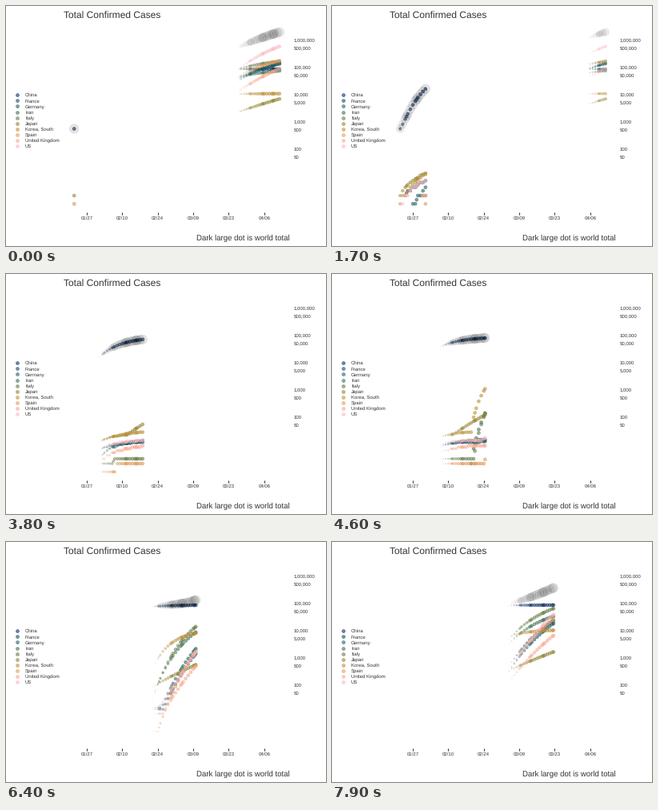
A matplotlib script for the animation above (8000 ms loop, 400 px wide and 300 px high).

```python
import numpy as np
import matplotlib.pyplot as plt
from matplotlib.animation import FuncAnimation
from matplotlib.colors import LinearSegmentedColormap

W, H, DPI = 400, 300, 100
PT = 72 / DPI              # points per pixel
STEPS, LAST_DAY = 100, 81  # full timeline: day 0 is 01/22
HOLD, FRAMES = 5, 80
WAKE = 21.5                # trail length in steps
INK = "#333333"

plt.rcParams["font.family"] = "Liberation Sans"
plt.rcParams["text.hinting"] = "none"

palette = LinearSegmentedColormap.from_list("dusk", [
    "#011959", "#103f60", "#1c5a62", "#3c6d56", "#687b3e",
    "#9d892b", "#d29343", "#f8a17b", "#fdb7bc", "#faccfa"])

days = np.arange(LAST_DAY + 1)
# Each day falls on a whole step; steps in between are tweened
day_steps = np.round(days * (STEPS - 1) / LAST_DAY)


def per_step(values):
    return np.interp(np.arange(STEPS), day_steps, values)


def day_x(day):
    return 85.2 + 3.168 * day


def count_y(log_count):
    return 247.3 - 34.25 * log_count


def saturate(age, rate):
    return 1 - np.exp(-rate * np.maximum(age, 0))


def cases(start, first, plateau, outbreak, final, rate, bend=1.0):
    """Daily counts: a few imported cases level off, then an outbreak slows down."""
    imported = np.log10(first) + np.log10(plateau / first) * saturate(days - start, 0.13)
    spread = saturate(days - outbreak, rate) / saturate(LAST_DAY - outbreak, rate)
    logs = imported + np.log10(final / plateau) * spread ** bend
    return np.where(days >= start, np.round(10 ** logs), np.nan)


countries = {
    "China": cases(0, 548, 548, 0, 83100, 0.125, 1.2),
    "France": cases(2, 2, 13, 35, 133700, 0.045),
    "Germany": cases(5, 1, 16, 34.5, 127900, 0.05),
    "Iran": cases(28, 2, 2, 28, 71700, 0.062, 0.75),
    "Italy": cases(9, 2, 3, 29, 156400, 0.06, 0.75),
    "Japan": cases(0, 2, 27, 21, 6750, 0.013),
    "Korea, South": cases(0, 1, 31, 28, 10500, 0.135, 0.75),
    "Spain": cases(10, 1, 2, 33, 166800, 0.053),
    "United Kingdom": cases(9, 2, 10, 35, 85200, 0.03),
    "US": cases(0, 1, 15, 32, 555300, 0.05, 1.6),
}
colors = palette(np.linspace(0.06, 0.9, len(countries)))[:, :3]

# The rest of the world adds up to a third more towards the end
rest = 0.32 * np.clip((days - 45) / 36, 0, 1) ** 0.7
world = np.nansum(list(countries.values()), axis=0) * (1 + rest)

# Each layer: height at every step, colour, opacity, point size
DOT, HALO = (0.58, 1.5), (0.1, 5)
xs = day_x(per_step(days))
layers = [(count_y(per_step(np.log10(n))), rgb, *DOT)
          for n, rgb in zip(countries.values(), colors)]
layers.append((count_y(per_step(np.log10(world))), np.zeros(3), *HALO))


def marker_area(size):
    radius = 0.375 * (2.845 * size + 0.945)
    return (2 * radius * PT) ** 2


fig = plt.figure(figsize=(W / DPI, H / DPI), dpi=DPI, facecolor="white")
ax = fig.add_axes([0, 0, 1, 1])
ax.set_xlim(0, W)
ax.set_ylim(H, 0)
ax.axis("off")


def label(x, y, text, px=6, ha="left"):
    ax.text(x, y, text, fontsize=px * PT, color=INK, ha=ha, va="baseline")


label(72, 15, "Total Confirmed Cases", 12)
label(354.5, 293, "Dark large dot is world total", 9.6, "right")

for power in range(2, 7):
    for n in (10 ** power // 2, 10 ** power):
        label(359.3, count_y(np.log10(n)) + 2.1, f"{n:,}")

for i, date in enumerate(["01/27", "02/10", "02/24", "03/09", "03/23", "04/06"]):
    x = day_x(5 + 14 * i)
    ax.plot([x, x], [258, 260.6], color=INK, lw=1.1 * PT, solid_capstyle="butt")
    label(x, 267.2, date, ha="center")

for i, (name, rgb) in enumerate(zip(countries, colors)):
    y = 111.2 + 7.1 * i
    ax.scatter([14.2], [y], s=marker_area(DOT[1]), color=[(*rgb, DOT[0])],
               linewidths=0.7 * PT)
    label(24, y + 2.2, name)

dots = ax.scatter([], [], linewidths=0.7 * PT)


def draw(frame):
    now = max(0, frame - HOLD)
    ages = np.arange(int(WAKE), -1, -1)
    steps = (now - ages) % STEPS
    fade = 1 - (ages / WAKE) ** 3

    points, areas, rgba = [], [], []
    for heights, rgb, alpha, size in layers:
        y = heights[steps]
        seen = ~np.isnan(y)
        f = fade[seen]
        points.append(np.column_stack([xs[steps][seen], y[seen]]))
        areas.append(marker_area(size * f))
        rgba.append(np.column_stack([np.tile(rgb, (len(f), 1)), alpha * f]))

    dots.set_offsets(np.vstack(points))
    dots.set_sizes(np.concatenate(areas), DPI)
    dots.set_facecolors(np.vstack(rgba))
    dots.set_edgecolors(np.vstack(rgba))
    return [dots]


anim = FuncAnimation(fig, draw, frames=FRAMES, interval=100, repeat=True,
                     repeat_delay=0, init_func=lambda: draw(0))
plt.show()
```
